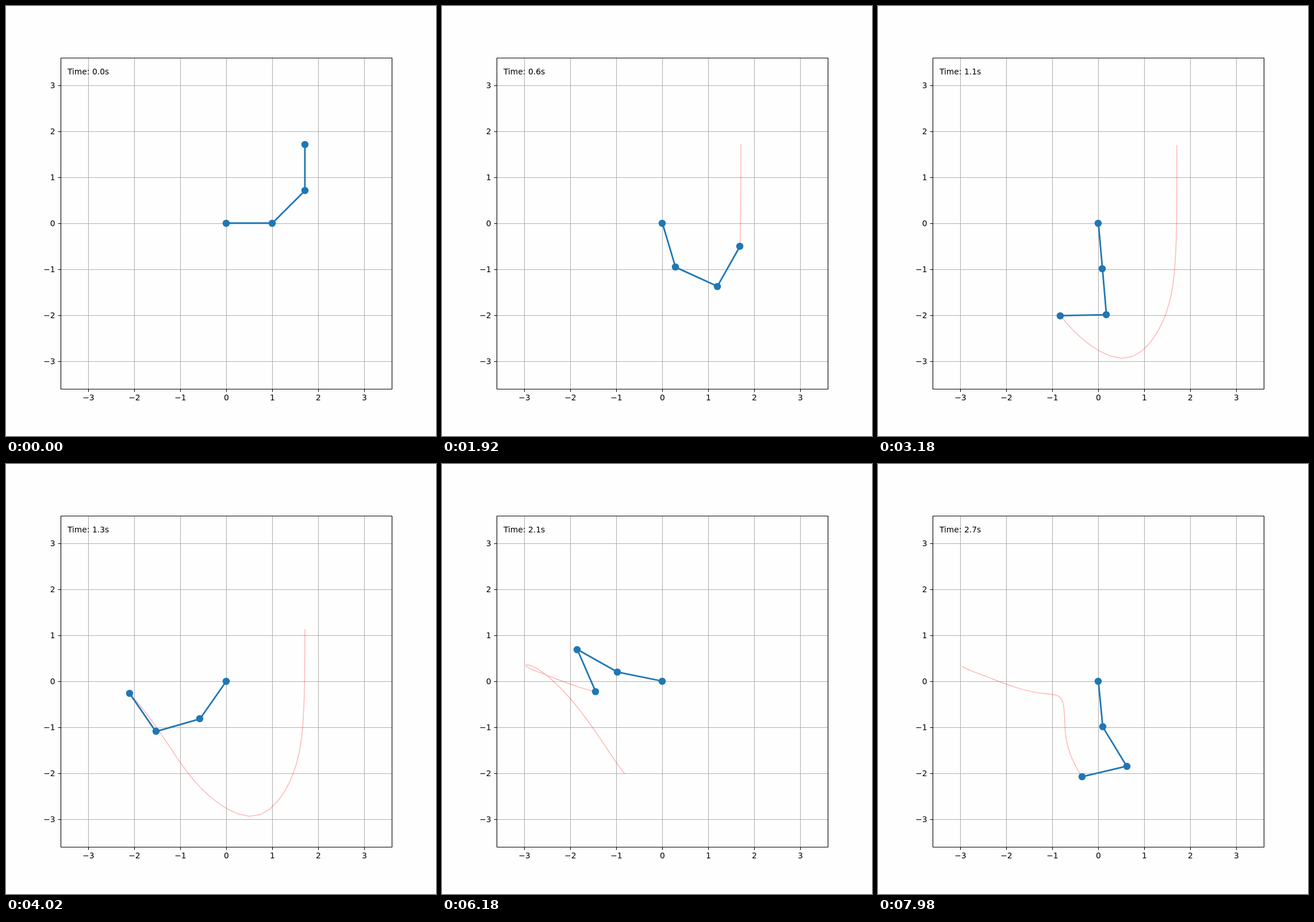
An HTML page with a canvas for the animation above (8000 ms loop, 748 by 748 pixels).

```html
<!DOCTYPE html>
<html lang="en">
<head>
<meta charset="utf-8">
<title>Triple pendulum</title>
<style>
  html, body { margin: 0; width: 100%; height: 100%; overflow: hidden; background: #fefefe; }
  canvas { display: block; }
</style>
</head>
<body>
<canvas id="stage" width="748" height="748"></canvas>
<script>
const ctx = document.getElementById('stage').getContext('2d');
const LOOP = 8000, STEP = 60, DT = 0.02, TRAIL = 50, SUBSTEPS = 10, G = 9.81;
const FRAMES = Math.ceil(LOOP / STEP);
const AXES = { left: 95.37, top: 89.76, size: 575.96 };
const SCALE = AXES.size / 7.2;
const toX = x => AXES.left + AXES.size / 2 + x * SCALE;
const toY = y => AXES.top + AXES.size / 2 - y * SCALE;
const crisp = v => Math.floor(v + 0.5) + 0.5;

// Angular accelerations of three unit masses on unit rods (angles from straight down).
function accelerations(th, w) {
  const mass = (i, j) => 3 - Math.max(i, j);
  const m = th.map((a, i) => {
    const row = th.map((b, j) => mass(i, j) * Math.cos(a - b));
    const force = th.reduce((sum, b, j) => sum - mass(i, j) * Math.sin(a - b) * w[j] ** 2,
      -G * mass(i, i) * Math.sin(a));
    return [...row, force];
  });
  for (let p = 0; p < 3; p++)
    for (let r = 0; r < 3; r++) {
      if (r === p) continue;
      const k = m[r][p] / m[p][p];
      for (let c = p; c < 4; c++) m[r][c] -= k * m[p][c];
    }
  return m.map((row, i) => row[3] / row[i]);
}

const derivative = s => [...s.slice(3), ...accelerations(s.slice(0, 3), s.slice(3))];
const advance = (s, d, h) => s.map((v, i) => v + h * d[i]);

function rungeKutta(s, h) {
  const a = derivative(s);
  const b = derivative(advance(s, a, h / 2));
  const c = derivative(advance(s, b, h / 2));
  const d = derivative(advance(s, c, h));
  return s.map((v, i) => v + h / 6 * (a[i] + 2 * b[i] + 2 * c[i] + d[i]));
}

function joints(state) {
  let x = 0, y = 0;
  const points = [[toX(0), toY(0)]];
  for (const a of state.slice(0, 3)) {
    x += Math.sin(a);
    y -= Math.cos(a);
    points.push([toX(x), toY(y)]);
  }
  return points;
}

const poses = [];
let state = [Math.PI / 2, Math.PI * 3 / 4, Math.PI, 0, 0, 0];
for (let i = 0; i < FRAMES; i++) {
  poses.push(joints(state));
  for (let k = 0; k < SUBSTEPS; k++) state = rungeKutta(state, DT / SUBSTEPS);
}

function polyline(points, color, width) {
  ctx.strokeStyle = color;
  ctx.lineWidth = width;
  ctx.beginPath();
  points.forEach(([x, y]) => ctx.lineTo(x, y));
  ctx.stroke();
}

function drawAxes() {
  const left = crisp(AXES.left), right = crisp(AXES.left + AXES.size);
  const top = crisp(AXES.top), bottom = crisp(AXES.top + AXES.size);
  ctx.fillStyle = '#000';
  for (let n = -3; n <= 3; n++) {
    const x = crisp(toX(n)), y = crisp(toY(n));
    const label = String(n).replace('-', '\u2212');
    polyline([[x, top], [x, bottom]], '#b0b0b0', 1.11);
    polyline([[left, y], [right, y]], '#b0b0b0', 1.11);
    polyline([[x, bottom], [x, bottom + 4.86]], '#000', 1.11);
    polyline([[left - 4.86, y], [left, y]], '#000', 1.11);
    ctx.textAlign = 'center';
    ctx.fillText(label, toX(n), 686);
    ctx.textAlign = 'right';
    ctx.fillText(label, 85.65, Math.round(toY(n)) + 5);
  }
  ctx.strokeStyle = '#000';
  ctx.strokeRect(left, top, right - left, bottom - top);
}

function draw(index) {
  ctx.fillStyle = '#fefefe';
  ctx.fillRect(0, 0, 748, 748);
  ctx.font = '13.89px "DejaVu Sans", sans-serif';
  ctx.lineJoin = 'round';
  ctx.lineCap = 'butt';
  drawAxes();

  const trail = poses.slice(Math.max(0, index - TRAIL), index + 1).map(p => p[3]);
  ctx.lineCap = 'square';
  if (trail.length > 1) polyline(trail, 'rgba(255, 0, 0, 0.3)', 1.39);

  const blue = '#1f77b4';
  polyline(poses[index], blue, 2.78);
  ctx.fillStyle = blue;
  for (const [x, y] of poses[index]) {
    ctx.beginPath();
    ctx.arc(Math.floor(x + 0.5), Math.floor(y + 0.5), 6.25, 0, 2 * Math.PI);
    ctx.fill();
  }

  ctx.fillStyle = '#000';
  ctx.textAlign = 'left';
  ctx.fillText(`Time: ${(index * DT).toFixed(1)}s`, 106.9, 119);
}

const start = performance.now();
function tick() {
  draw(Math.floor((performance.now() - start) % LOOP / STEP));
  requestAnimationFrame(tick);
}
tick();
</script>
</body>
</html>
```
